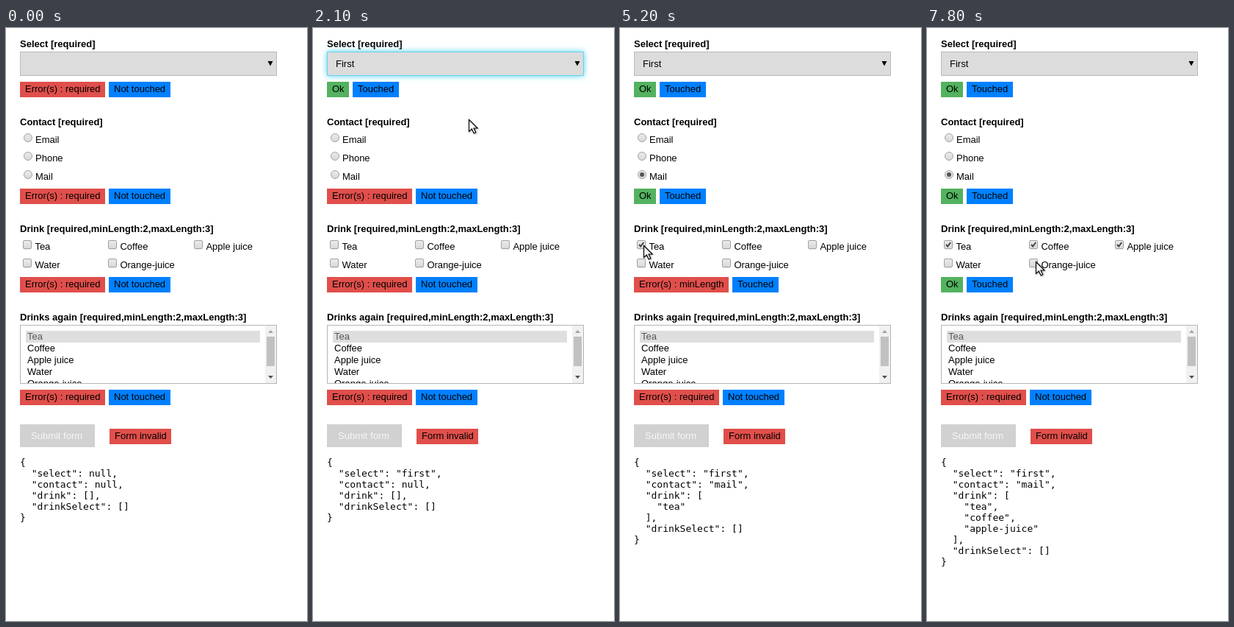
An HTML page for the animation above (8 s loop, 410x805 px).

```html
<!DOCTYPE html>
<html lang="en">
<head>
<meta charset="utf-8">
<title>Form validation</title>
<style>
  html, body { margin: 0; width: 100%; height: 100%; overflow: hidden; background: #fff; }
  #stage { position: relative; width: 410px; height: 805px; overflow: hidden;
    font: 13px/15px "Liberation Sans", Arial, sans-serif; color: #000; }
  #stage * { position: absolute; box-sizing: border-box; white-space: pre; }
  #stage pre { left: 19px; top: 582px; margin: 0; font: 13px/15px "DejaVu Sans Mono", monospace; }
  #stage svg { overflow: visible; }
  #stage svg * { position: static; }
  b { font-weight: bold; }
  .badge { height: 21px; padding: 2px 7px; }
  .red { background: #e04f4b; }
  .blue { background: #0080ff; }
  .green { background: #53b25f; }
  .select { left: 19px; top: 32px; width: 350px; height: 33px; background: #dcdcdc; border: 1px solid #b9b9b9; }
  .radio, .check { width: 12px; height: 12px; border: 1px solid #a2a2a2;
    background: linear-gradient(#eaeaea, #d9d9d9); }
  .radio { border-radius: 50%; }
  .check { border-radius: 2px; box-shadow: 0 1px 1px rgba(0,0,0,.08); }
  .pressed { background: #cfcfcf; border-color: #808080; }
  .dot { left: 2px; top: 2px; width: 6px; height: 6px; border-radius: 50%; background: #555; }
  .list { left: 19px; top: 403px; width: 350px; height: 80px; border: 1px solid #b5b5b5; overflow: hidden; }
  .chosen { left: 7px; top: 7px; width: 319px; height: 16px; background: #dedede; }
  .track { left: 333px; top: 0; width: 15px; height: 78px; background: #f1f1f1; }
  .thumb { left: 2px; top: 15px; width: 11px; height: 40px; background: #c1c1c1; }
  .submit { left: 19px; top: 538px; width: 102px; height: 31px; background: #d1d1d1; }
  .menu { left: 19px; top: 65px; width: 350px; height: 130px; background: #f6f6f6;
    border: 1px solid #d98a72; box-shadow: 0 10px 32px rgba(0,0,0,.42); }
  .hot { left: 0; width: 348px; height: 32px; background: #f97347; }
</style>
</head>
<body>
<div id="stage"></div>
<script>
const LOOP = 8000, STEP = 100;
const stage = document.getElementById('stage');

// Pointer path: time, x, y of the tip
const PATH = [
  [500, 296, 3], [900, 284, 44], [1000, 284, 44], [1300, 229, 99], [1600, 219, 112],
  [2000, 219, 112], [2100, 212, 124], [2400, 184, 140], [2700, 184, 140],
  [3300, 54, 175], [3400, 54, 176], [3600, 48, 199], [3800, 27, 199], [4000, 27, 199],
  [4200, 44, 237], [4400, 45, 262], [4800, 31, 295], [5000, 32, 295], [5200, 32, 295],
  [5500, 95, 281], [5800, 142, 290], [6100, 142, 290], [6200, 151, 286],
  [6600, 220, 284], [7000, 258, 290], [7100, 260, 292], [7300, 259, 293], [7800, 148, 317]
];

function pointerAt(t) {
  const i = PATH.findIndex(p => p[0] > t);
  if (i < 0) return PATH[PATH.length - 1].slice(1);
  const [t0, x0, y0] = PATH[i - 1], [t1, x1, y1] = PATH[i];
  const k = (t - t0) / (t1 - t0);
  return [Math.round(x0 + (x1 - x0) * k), Math.round(y0 + (y1 - y0) * k)];
}

const box = (cls, x, y, inner = '', style = '') =>
  `<div class="${cls}" style="left:${x}px;top:${y}px;${style}">${inner}</div>`;

const text = (x, baseline, str, color = 'inherit', tag = 'span') =>
  `<${tag} style="left:${x}px;top:${baseline - 12}px;color:${color}">${str}</${tag}>`;

const shape = (points, fill) =>
  `<svg width="1" height="1" style="left:0;top:0"><polygon points="${points}" fill="${fill}"/></svg>`;

const badge = (color, x, y, width, label) =>
  box('badge ' + color, x, y, label, `width:${width}px`);

function status(y, error, touched) {
  const width = !error ? 30 : error === 'required' ? 116 : 129;
  return badge(error ? 'red' : 'green', 19, y, width, error ? 'Error(s) : ' + error : 'Ok') +
    badge('blue', 24 + width, y, touched ? 63 : 84, touched ? 'Touched' : 'Not touched');
}

const radio = (y, label, on) =>
  box('radio', 24, y, on ? '<i class="dot"></i>' : '') + text(40, y + 13, label);

function check(x, y, label, on, pressed) {
  const tick = '<svg width="10" height="10" style="left:0;top:0">' +
    '<path d="M2 5L4.2 7.5L8.2 2" fill="none" stroke="#444" stroke-width="2"/></svg>';
  return box('check' + (pressed ? ' pressed' : ''), x, y, on ? tick : '') + text(x + 16.4, y + 13, label);
}

function selectBox(s) {
  const style = s.glow
    ? `border-color:rgb(102,211,235);box-shadow:0 0 8px rgba(80,208,240,${s.glow})` : '';
  return box('select', 19, 32, '', style) + (s.select ? text(31, 53, 'First') : '') +
    shape('356.5,45 363.5,45 360,51.5', '#000');
}

function menu(hot) {
  const items = ['', 'First', 'Second', 'Third'].map((name, i) =>
    text(11, 21 + 32 * i, name, i === hot ? '#fff' : '#000')).join('');
  return box('menu', 19, 65, box('hot', 0, 32 * hot) + items);
}

function listBox() {
  const items = ['Tea', 'Coffee', 'Apple juice', 'Water', 'Orange-juice'].map((name, i) =>
    text(9, 19 + 16 * i, name, i ? '#000' : '#555')).join('');
  return `<div class="list"><div class="chosen"></div>${items}
    <div class="track"><div class="thumb"></div>${
      shape('4,10 11,10 7.5,6', '#a3a3a3') + shape('4,68 11,68 7.5,72', '#505050')}</div></div>`;
}

function pointer(t) {
  const [x, y] = pointerAt(t);
  const beam = t === 4200;
  const d = beam ? 'M-3-6H-1L0-5L1-6H3M0-5V5M-3 6H-1L0 5L1 6H3'
    : 'M.5.5V16.5L4.3 13L7.2 19L9.8 17.8L7 12H12Z';
  const paint = beam
    ? `<path d="${d}" fill="none" stroke="#fff" stroke-width="4"/><path d="${d}" fill="none" stroke="#000" stroke-width="1.8"/>`
    : `<path d="${d}" fill="#fff" stroke="#000" stroke-width="1.2"/>`;
  return `<svg width="14" height="21" style="left:${x}px;top:${y}px;filter:drop-shadow(1px 1px 1px rgba(0,0,0,.3))">${paint}</svg>`;
}

function stateAt(t) {
  const drink = [[5200, 'tea'], [6200, 'coffee'], [7300, 'apple-juice']]
    .filter(([at]) => t >= at).map(([, name]) => name);
  return {
    glow: t < 1100 ? 0 : Math.max(0, Math.min(1, (3100 - t) / 400)),
    select: t >= 2100 ? 'first' : null,
    contact: t >= 4000 ? 'mail' : t >= 3400 ? 'phone' : null,
    drink
  };
}

function view(t) {
  const s = stateAt(t), { select, contact, drink } = s;
  const json = JSON.stringify({ select, contact, drink, drinkSelect: [] }, null, 2);
  const drinkError = !drink.length ? 'required' : drink.length < 2 ? 'minLength' : '';
  const title = (y, str) => text(19, y, str, 'inherit', 'b');
  return [
    title(26, 'Select [required]'), selectBox(s),
    status(73, select ? '' : 'required', select),

    title(132, 'Contact [required]'),
    radio(143, 'Email', false), radio(168, 'Phone', contact === 'phone'), radio(193, 'Mail', contact === 'mail'),
    status(218, contact ? '' : 'required', contact),

    title(277, 'Drink [required,minLength:2,maxLength:3]'),
    check(23, 288, 'Tea', drink.length > 0),
    check(139, 288, 'Coffee', drink.length > 1, t >= 6000 && t < 6200),
    check(256, 288, 'Apple juice', drink.length > 2),
    check(23, 313, 'Water'), check(139, 313, 'Orange-juice'),
    status(338, drinkError, drink.length),

    title(397, 'Drinks again [required,minLength:2,maxLength:3]'), listBox(),
    status(491, 'required', false),

    '<div class="submit"></div>', text(34, 558, 'Submit form', '#f7f7f7'),
    badge('red', 141, 544, 84, 'Form invalid'),
    `<pre>${json}</pre>`,
    t >= 1100 && t < 2100 ? menu(t < 1400 ? 0 : 1) : '',
    t >= 500 ? pointer(t) : ''
  ].join('');
}

let shown = -1;
function tick(now) {
  const t = Math.floor(now % LOOP / STEP) * STEP;
  if (t !== shown) stage.innerHTML = view(shown = t);
  requestAnimationFrame(tick);
}
tick(performance.now());
</script>
</body>
</html>
```
